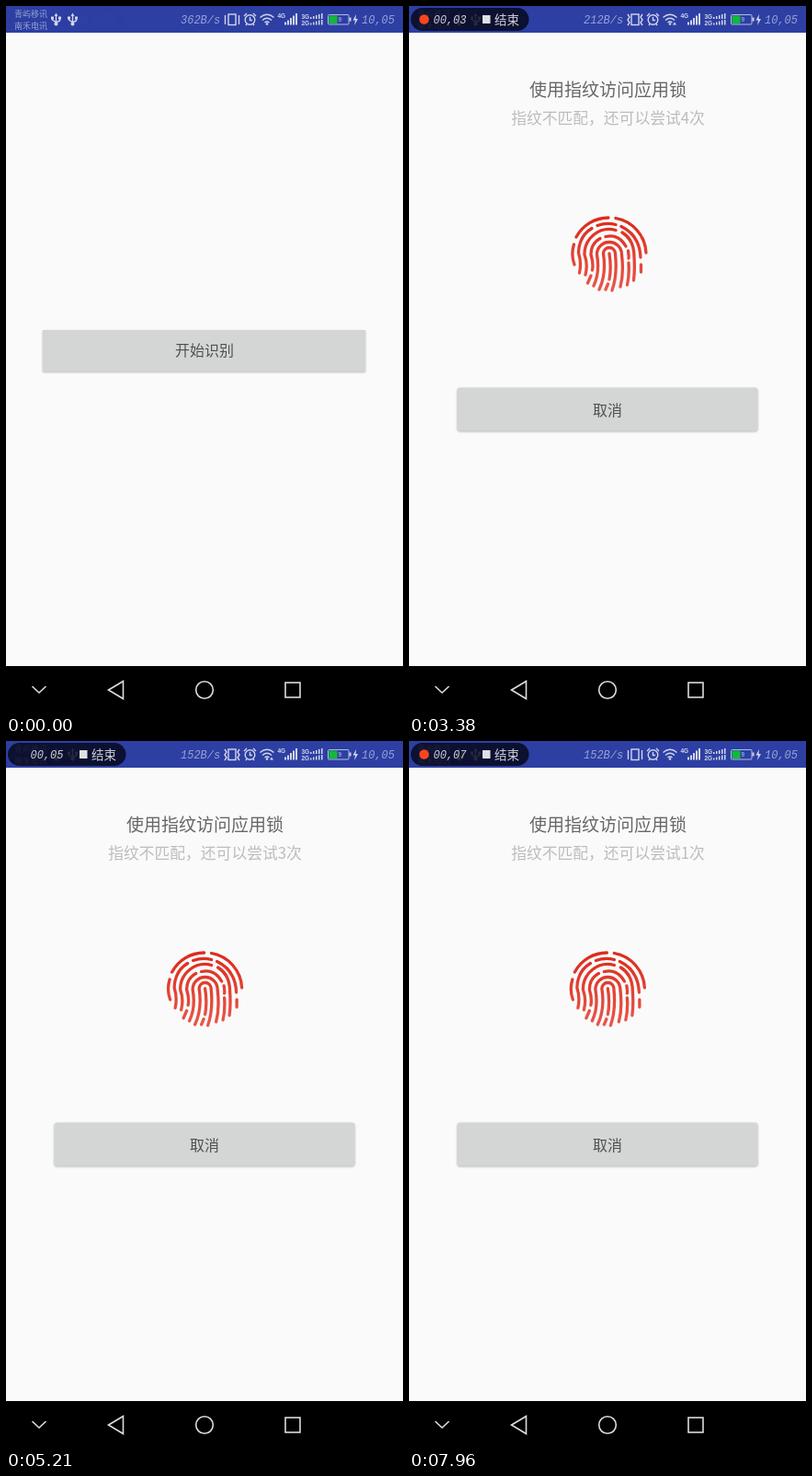
Write an HTML page that moves like this. It is 432x768 px and loops after 8 s.

```html
<!DOCTYPE html>
<html lang="zh">
<head>
<meta charset="utf-8">
<title>指纹识别</title>
<style>
html, body { margin: 0; width: 100%; height: 100%; overflow: hidden; background: #000; }
svg { display: block; width: 100vw; height: 100vh; }
text { font-family: "Noto Sans CJK SC", "Noto Sans CJK", sans-serif; font-weight: 300; text-anchor: middle; }
.mono { font: italic 12px "Liberation Mono", monospace; text-anchor: start; }
.tiny { font: 6.5px "Liberation Sans", sans-serif; font-weight: bold; text-anchor: start; }
.bg { fill: #fafafa; }
.button { fill: #d4d6d6; filter: drop-shadow(0 1px 1px #0004); }
.label { font-size: 16px; fill: #505050; }
.line { fill: none; stroke: #d2d6e8; stroke-width: 1.4; }
.solid { fill: #d2d6e8; }
.dim { fill: #97a2d2; }
</style>
</head>
<body>
<svg viewBox="0 0 432 768">
  <defs>
    <linearGradient id="heat" gradientUnits="userSpaceOnUse" x1="0" y1="228" x2="0" y2="311">
      <stop stop-color="#dc2a1a"/><stop offset="1" stop-color="#e9584c"/>
    </linearGradient>
    <g id="usb">
      <path class="line" d="M0 10V19M-4 13V15L0 18L4 16V13"/>
      <path class="solid" d="M0 7.500L2 11H-2ZM-5.500 11.500h3v3h-3zM2.500 11.500h3v3h-3z"/>
      <circle class="solid" cy="19.500" r="2"/>
    </g>
  </defs>

  <rect class="bg" width="432" height="768"/>
  <rect class="button" x="40" y="352" width="351" height="45"/>
  <text class="label" x="216" y="380">开始识别</text>

  <g id="page">
    <rect class="bg" width="432" height="768"/>
    <text x="216.500" y="98" font-size="19" fill="#666">使用指纹访问应用锁</text>
    <text id="hint" x="216.500" y="128" font-size="16.800" fill="#bcbcbe"></text>
    <rect class="button" x="52.500" y="414.500" width="327" height="47" rx="3"/>
    <text class="label" x="216" y="445">取消</text>
    <path id="print" fill="none" stroke="url(#heat)" stroke-width="3.300" stroke-linecap="round" d="
      M180 251A40 40 0 0 1 215 230M223 230.500A40 40 0 0 1 256 268
      M177.500 259Q174 270 178 281M250.500 281V289
      M203 238.500Q213 235 223 237.500M229 239.500Q249 249 250 273
      M197 241.500Q183 250 182.500 268Q186 279 183.500 290
      M223 243.500A27 27 0 0 0 189 270Q193 281 190 292M192.500 301L196 293
      M230 246Q243 254 243 272Q244 287 242.500 298
      M206 252.500Q196 258 196 270Q199 280 197.500 287
      M212 250.500Q226 247 234 261M236.500 266Q237.500 273 237 274M237 279Q238 292 235.500 303
      M199 304Q206 289 202.500 270A13.500 13.500 0 0 1 229.500 270Q232 290 228 305
      M205 308Q213 291 209.500 269A6.500 6.500 0 0 1 222.500 269Q225 292 219 309
      M216 269Q218.500 284 216 297M214.500 302L212 308"/>
  </g>

  <rect width="432" height="29" fill="#2d3fa3"/>
  <g font-size="9" class="dim">
    <text x="27" y="12">青屿移讯</text>
    <text x="27" y="25">南禾电讯</text>
  </g>
  <use href="#usb" x="54.500"/>
  <use href="#usb" x="72.500"/>
  <text id="speed" class="mono dim" x="190" y="19"></text>
  <rect class="line" x="242" y="9" width="8" height="11.500"/>
  <path id="buzz" class="line"/>
  <g class="line">
    <circle cx="265.500" cy="15" r="5.300"/>
    <path d="M265.500 12V15.500H268M259 11L262 8M272 11L269 8M261 21L262 19.500M270 21L269 19.500"/>
    <path d="M276.500 12.500Q284 6 291.500 12.500M279 15.500Q284 11 289 15.500M281.500 18Q284 16 286.500 18"/>
  </g>
  <circle class="solid" cx="284" cy="19.500" r="1.300"/>
  <path id="traffic" class="solid" d="M287 20.500L289 17.500L291 20.500Z"/>
  <g class="solid">
    <text class="tiny" x="295.500" y="13">4G</text>
    <text class="tiny" x="321.500" y="13.500">3G</text>
    <text class="tiny" x="321.500" y="20.500">2G</text>
  </g>
  <path class="solid" d="M303 17.500h2v3h-2zM306 15.500h2v5h-2zM309 13h2v7.500h-2zM312 10.500h2v10h-2zM315 8h2v12.500h-2z"/>
  <path class="solid" d="M331 12h1.500v2h-1.500zM334 11h1.500v3h-1.500zM337 10h1.500v4h-1.500zM340 9h1.500v5h-1.500zM343 8h1.500v6h-1.500z"/>
  <path class="solid" d="M331 18.500h1.500v2h-1.500zM334 17.500h1.500v3h-1.500zM337 16.500h1.500v4h-1.500zM340 15.500h1.500v5h-1.500zM343 15h1.500v5.500h-1.500z"/>
  <rect x="350.500" y="9.500" width="22.500" height="10.500" rx="1" fill="none" stroke="#b4bce0"/>
  <path class="solid" d="M373.500 12.500h2v4h-2z"/>
  <rect x="351.500" y="10.500" width="9" height="8.500" fill="#12b83e"/>
  <text class="tiny dim" x="361.500" y="17">9</text>
  <path class="solid" d="M381 9L377.500 15.500H380L379 21L383 14H380.500Z"/>
  <text class="mono dim" x="387" y="19">10,05</text>

  <g id="pill">
    <rect x="2" y="2" width="128.500" height="25" rx="12.500" fill="#06081c" fill-opacity=".84"/>
    <circle id="dot" cx="16.500" cy="14.500" r="5.300" fill="#f8461c"/>
    <text id="clock" class="mono" x="26.500" y="19" fill="#cfd0d8"></text>
    <rect x="80" y="10" width="8.500" height="9" fill="#e0e0e4"/>
    <text x="106.500" y="20" font-size="13.500" fill="#cfd0d8">结束</text>
  </g>

  <rect y="717" width="432" height="51"/>
  <g fill="none" stroke="#dcdcdc" stroke-width="1.600">
    <path d="M28.500 739L36 746L43.500 739M111.500 743L127.500 733.500V752.500Z"/>
    <circle cx="216" cy="743" r="9.300"/>
    <rect x="304" y="735" width="16" height="16"/>
  </g>
</svg>
<script>
const LOOP = 8000, SHAKE = 1291, CYCLES = 12;
const $ = id => document.getElementById(id);
const clamp = v => Math.min(1, Math.max(0, v));
const show = (id, on) => $(id).setAttribute("visibility", on ? "visible" : "hidden");
const passed = (times, t) => times.filter(s => s <= t).length;

const fails = [3250, 4560, 5750, 7420];
// The dot goes off, on, off...; each "off" starts a new second.
const blinks = [710, 1210, 1710, 2210, 2750, 3250, 4000, 4580, 5060, 5460, 5860, 6500, 7210, 7700];
const speeds = [362, 212, 152];

function draw(t) {
  const slide = (1 - clamp((t - 600) / 500)) ** 3;
  $("page").setAttribute("transform", `translate(${432 * slide})`);

  const n = passed(fails, t);
  $("hint").textContent = n ? `指纹不匹配，还可以尝试${5 - n}次` : "请轻触感应器验证指纹";
  const p = n ? clamp((t - fails[n - 1]) / SHAKE) : 0;
  $("print").setAttribute("transform", `translate(${2 * Math.sin(2 * Math.PI * CYCLES * p)})`);

  const blink = passed(blinks, t);
  show("dot", blink % 2 === 0);
  $("clock").textContent = "00,0" + Math.ceil(blink / 2);
  $("pill").setAttribute("opacity", clamp(t / 200));
  $("speed").textContent = speeds[passed([2380, 5000], t)] + "B/s";

  const active = t > 830 && t < 6580;
  $("buzz").setAttribute("d", active
    ? "M238 9L240 12L238 15L240 18L238 21M254 9L252 12L254 15L252 18L254 21"
    : "M238.500 10V20M253.500 10V20");
  show("traffic", t >= 1460 && t < 6580);
}

function tick() {
  draw(performance.now() % LOOP);
  requestAnimationFrame(tick);
}
tick();
</script>
</body>
</html>
```
